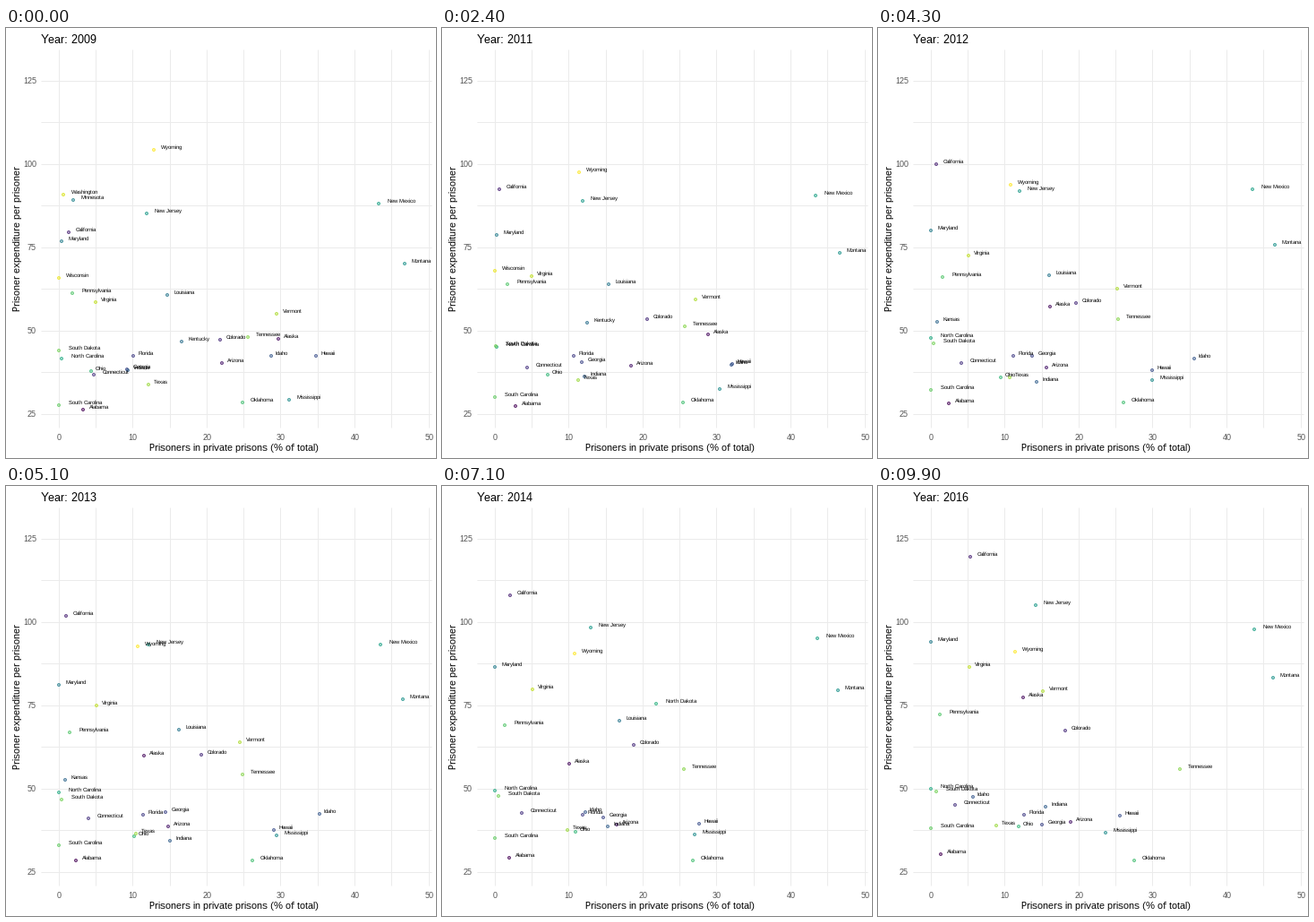
Write a matplotlib script that moves like this. It is 480 px wide and 480 px high and loops after 10000 ms.

```python
import numpy as np
import matplotlib.pyplot as plt
from matplotlib.animation import FuncAnimation
from matplotlib.patches import Rectangle

SIZE, DPI = 480, 96
FRAMES, INTERVAL = 100, 100
FIRST, LAST = 2009, 2016
PT = 72 / DPI                       # one pixel in points
LEFT, RIGHT, TOP, BOTTOM = 39, 475, 24, 446

plt.rcParams["font.family"] = "Liberation Sans"
plt.rcParams["text.hinting"] = "native"
plt.rcParams["text.hinting_factor"] = 1

tracks = []


def track(name, *pts, span=(FIRST, LAST)):
    """A straight-line path through pts, spread evenly over a span of years."""
    begin, end = (round((y - FIRST) * (FRAMES - 1) / (LAST - FIRST)) for y in span)
    xs, ys = zip(*pts)
    tracks.append((name, np.linspace(begin, end, len(pts)), xs, ys))


track("Alabama", (86, 426), (70, 411))
track("Alaska", (304, 347), (297, 342), (155, 300), (140, 312), (162, 236))
track("Arizona", (241, 374), (180, 380), (215, 375))
track("California", (70, 228), (62, 162), (71, 130), (103, 79))
track("Colorado", (239, 348), (218, 301), (209, 273))
track("Connecticut", (98, 387), (86, 356))
track("Florida", (142, 366), (163, 367))
track("Georgia", (135, 381), (178, 364), (183, 378))
track("Hawaii", (346, 366), (300, 384), (270, 368))
track("Idaho", (296, 366), (324, 376), (364, 366), (129, 364), (106, 347))
track("Indiana", (136, 382), (183, 397), (187, 358))
track("Kansas", (65, 329), (66, 328), span=(2011, 2013))
track("Kentucky", (196, 350), (136, 314), span=(2009, 2012))
track("Louisiana", (180, 298), (198, 262), span=(2009, 2014))
track("Maryland", (62, 238), (59, 224), (59, 174))
track("Minnesota", (75, 192), span=(2009, 2009))
track("Mississippi", (316, 415), (304, 390), (254, 387))
track("Montana", (445, 263), (441, 214))
track("New Jersey", (157, 207), (158, 178), (176, 133))
track("New Mexico", (416, 196), (420, 160))
track("North Carolina", (62, 369), (59, 342), (59, 338))
track("North Dakota", (239, 243), span=(2014, 2014))
track("Ohio", (95, 383), (143, 391), (157, 380))
track("Oklahoma", (264, 418), (286, 418))
track("Pennsylvania", (74, 296), (69, 255))
track("South Carolina", (59, 421), (59, 382))
track("South Dakota", (59, 360), (65, 341))
track("Tennessee", (270, 345), (272, 329), (258, 316), (337, 316))
track("Texas", (159, 398), (132, 379))
track("Vermont", (302, 319), (256, 282), span=(2009, 2013))
track("Vermont", (173, 219), (184, 229), span=(2015, 2016))
track("Virginia", (100, 306), (101, 246), (102, 202))
track("Washington", (64, 186), span=(2009, 2009))
track("Wisconsin", (59, 279), (59, 265), span=(2009, 2012))
track("Wyoming", (165, 136), (148, 170), (147, 187), (153, 185))

fig = plt.figure(figsize=(SIZE / DPI, SIZE / DPI), dpi=DPI, facecolor="white")
ax = fig.add_axes([0, 0, 1, 1])
ax.set(xlim=(0, SIZE), ylim=(SIZE, 0))
ax.axis("off")


def write(x, y, s, px, color="black", **kw):
    return ax.text(x, y, s, fontsize=px * PT, color=color, va="baseline", **kw)


def rule(xs, ys):
    ax.plot(xs, ys, color="#EBEBEB", lw=PT, solid_capstyle="butt", zorder=1)


# Grid and axis labels
for v in range(0, 51, 5):
    x = round(58.65 + 8.26 * v)
    rule([x, x], [TOP, BOTTOM])
    if v % 10 == 0:
        write(x + 0.5, 460, str(v), 9, "#4D4D4D", ha="center")
for v in np.arange(25, 126, 12.5):
    y = int(431 - 3.72 * (v - 25))
    rule([LEFT, RIGHT], [y, y])
    if v % 25 == 0:
        write(34, y + 3, f"{v:.0f}", 9, "#4D4D4D", ha="right")

write(255, 472, "Prisoners in private prisons (% of total)", 11, ha="center")
write(16, 235, "Prisoner expenditure per prisoner", 11, ha="center",
      rotation=90, rotation_mode="anchor")
title = write(38.7, 17, "", 13)

# Points and their labels
panel = Rectangle((LEFT, TOP), RIGHT - LEFT, BOTTOM - TOP, transform=ax.transData)
names = sorted({t[0] for t in tracks})
shades = plt.get_cmap("viridis")(np.linspace(0, 1, len(names)))
colors = np.array([shades[names.index(t[0])] for t in tracks])
fills, rings = colors.copy(), colors.copy()
fills[:, 3], rings[:, 3] = 0.4, 0.75
dots = ax.scatter([0] * len(tracks), [0] * len(tracks), s=(3 * PT) ** 2,
                  facecolors=fills, edgecolors=rings, linewidths=PT, zorder=2)
labels, shifts = [], []
for name, *_ in tracks:
    label = write(0, 0, name, 6, clip_on=True, zorder=3)
    label.set_clip_path(panel)
    labels.append(label)
    shifts.append(0.28 * label.get_window_extent().width + 1)


def update(i):
    year = FIRST + (LAST - FIRST) * i / (FRAMES - 1)
    title.set_text(f"Year: {int(year + 0.5)}")
    spots = []
    for (_, knots, xs, ys), label, shift in zip(tracks, labels, shifts):
        shown = knots[0] <= i <= knots[-1]
        x = round(np.interp(i, knots, xs))
        y = round(np.interp(i, knots, ys))
        label.set_visible(shown)
        label.set_position((x + shift, y - 1))
        spots.append((x, y) if shown else (np.nan, np.nan))
    dots.set_offsets(spots)
    return [title, dots, *labels]


anim = FuncAnimation(fig, update, frames=FRAMES, interval=INTERVAL,
                     repeat=True, repeat_delay=0, blit=False)
plt.show()
```
